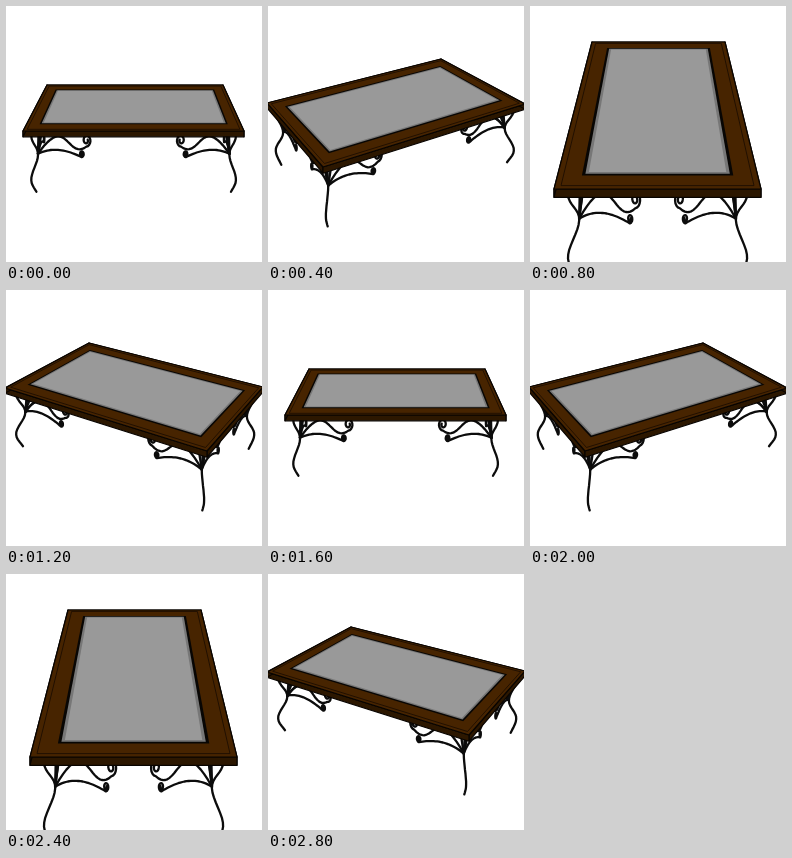
Animation of 256x256 px, one loop 3.2 s. Source, as an HTML page:

```html
<!DOCTYPE html>
<html lang="en">
<head>
<meta charset="utf-8">
<title>Turning table</title>
<style>
  html, body { margin: 0; width: 100%; height: 100%; overflow: hidden; background: #fff; }
  svg { display: block; width: 100%; height: 100%; }
  polygon { stroke-linejoin: round; }
  .iron { fill: none; stroke: #0c0c0c; stroke-width: 2.3; stroke-linecap: round; stroke-linejoin: round; }
  .side { fill: #2c1700; stroke: #080400; stroke-width: 1.2; }
  .wood { fill: #472400; stroke: #080400; stroke-width: 1.2; }
  .groove { fill: none; stroke: #1d0e00; stroke-width: .9; }
  .rim { fill: #080604; }
  .bevel { fill: #777; }
  .glass { fill: #999; }
</style>
</head>
<body>
<svg id="stage" viewBox="0 0 256 256"></svg>
<script>
const stage = document.getElementById('stage');
const holdTime = 400;
const thickness = 0.085;   // heights are fractions of the leg length
const kneeHeight = 0.44;
const insets = { wood: 0, groove: 0.03, rim: 0.122, bevel: 0.138, glass: 0.154 };
const square = [[0, 0], [1, 0], [1, 1], [0, 1]];

const samples = (count, point) => Array.from({ length: count + 1 }, (_, i) => point(i / count));
const shape = (tag, name, points) =>
  `<${tag} class="${name}" points="${points.map(p => p.map(n => n.toFixed(1))).join(' ')}"/>`;
const mirror = art => `<g transform="matrix(-1 0 0 1 256 0)">${art}</g>`;

// Maps tabletop position (u long, v short) and depth below it to the stage.
function camera([[x0, y0], [x1, y1], [x2, y2], [x3, y3]], legLength) {
  const ax = x1 - x2, ay = y1 - y2, bx = x3 - x2, by = y3 - y2;
  const sx = x0 - x1 + x2 - x3, sy = y0 - y1 + y2 - y3;
  const det = ax * by - bx * ay;
  const g = (sx * by - sy * bx) / det, h = (ax * sy - ay * sx) / det;
  const distance = (u, v) => 1 + g * u + h * v;
  const project = (u, v, z = 0) => {
    const w = distance(u, v);
    return [
      (x0 + (x1 - x0 + g * x1) * u + (x3 - x0 + h * x3) * v) / w,
      (y0 + (y1 - y0 + g * y1) * u + (y3 - y0 + h * y3) * v + z * legLength) / w
    ];
  };
  return { project, distance };
}

function bezier(a, b, c, d, t) {
  const s = 1 - t;
  return a.map((_, i) => s * s * s * a[i] + 3 * s * s * t * b[i] + 3 * s * t * t * c[i] + t * t * t * d[i]);
}

// A swept stem that rolls up into a spiral at its end.
function scroll(bendA, bendB, end, radius) {
  const stem = samples(24, t => bezier([0, kneeHeight], bendA, bendB, end, t));
  const curl = samples(24, t => {
    const angle = Math.PI * (0.5 - 2.6 * t), r = radius * (1 - 0.7 * t);
    return [end[0] + r * Math.cos(angle), end[1] - radius + r * Math.sin(angle)];
  });
  return stem.concat(curl);
}

const bracket = [
  scroll([0.6, -0.2], [0.6, 0.55], [1, 0.33], 0.095),
  scroll([0.3, 0.33], [0.6, 0.38], [0.9, 0.49], 0.05),
  [[0, kneeHeight], [0.08, thickness]]
];
const legInset = z => 0.085 + 0.025 * Math.cos(2 * Math.PI * (z - 0.45) / 0.66);

function drawLeg(project, cornerU, cornerV) {
  const knee = legInset(kneeHeight);
  const line = points => shape('polyline', 'iron', points.map(([u, v, z]) =>
    project(Math.abs(cornerU - u), Math.abs(cornerV - v), z)));
  const along = (start, reach, t) => start + (reach - start) * t;
  const post = samples(24, z => [legInset(z) / 2, legInset(z), z]);
  return line(post) + bracket.map(curve =>
    line(curve.map(([t, z]) => [along(knee / 2, 0.28, t), knee, z])) +
    line(curve.map(([t, z]) => [knee / 2, along(knee, 0.39, t), z]))).join('');
}

function drawTable(corners, legLength) {
  const { project, distance } = camera(corners, legLength);
  // The top hides the legs at the far corners.
  const legs = square.filter(([u, v]) => distance(u, v) < 0.95)
    .map(([u, v]) => drawLeg(project, u, v));
  const sides = square.map(([u, v], i) => {
    const [nextU, nextV] = square[(i + 1) % 4];
    return shape('polygon', 'side', [project(u, v), project(nextU, nextV),
      project(nextU, nextV, thickness), project(u, v, thickness)]);
  });
  const top = Object.entries(insets).map(([name, inset]) =>
    shape('polygon', name, square.map(([u, v]) =>
      project(Math.abs(u - inset / 2), Math.abs(v - inset)))));
  return [...legs, ...sides, ...top].join('');
}

const longView = drawTable([[41, 79], [217, 79], [238, 125], [17, 125]], 54);
const shortView = drawTable([[195, 36], [231, 183], [24, 183], [62, 36]], 63);
const cornerView = drawTable([[83, 53], [257, 97], [201, 161], [-1, 98]], 51);

stage.innerHTML = [longView, mirror(cornerView), shortView, cornerView]
  .map(art => `<g>${art}</g>`).join('');
const poses = [...stage.children];

function draw() {
  const current = Math.floor(performance.now() / holdTime) % poses.length;
  poses.forEach((pose, i) => { pose.style.display = i === current ? '' : 'none'; });
  requestAnimationFrame(draw);
}
draw();
</script>
</body>
</html>
```
